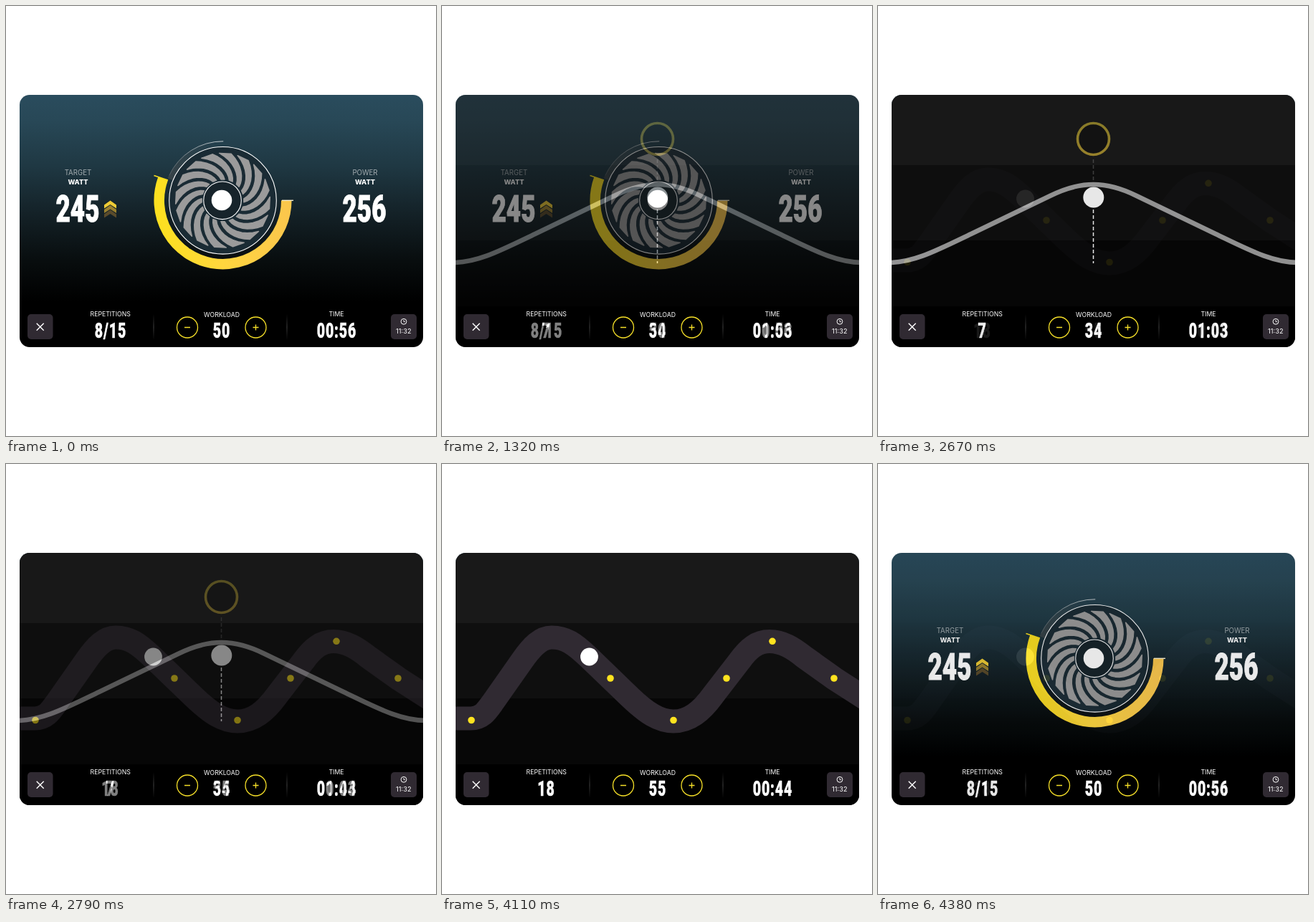
Animation of 600 by 600 pixels, one loop 4.41 s. Source, as an HTML page:

```html
<!DOCTYPE html>
<html lang="en">
<head>
<meta charset="utf-8">
<title>Workout display</title>
<style>
  html, body { margin: 0; width: 100%; height: 100%; overflow: hidden; background: #fff; }
  svg { display: block; width: 100vw; height: 100vh; }
  text { font-family: Inter, "Liberation Sans", sans-serif; fill: #fff; text-anchor: middle; }
  .num {
    font: 900 28.8px Roboto, "Liberation Sans", sans-serif; letter-spacing: 1.3px;
    stroke: #fff; stroke-width: .5px;
    transform: scaleX(.68); transform-box: fill-box; transform-origin: center;
  }
  .big { font-size: 51.5px; letter-spacing: 0; stroke-width: 1px; }
  .label { font-size: 8.7px; }
  .clock { font-size: 9.2px; }
  .soft { font-size: 9.7px; fill: #a3acb0; }
  .unit { font-size: 9.3px; font-weight: 800; }
  .line { fill: none; stroke: #fff; }
  .gold { fill: none; stroke: #f5df28; stroke-width: 1.3; }

  #wave { animation: wave 4410ms infinite; }
  #road { animation: road 4410ms infinite; }
  @keyframes wave {
    0% { opacity: 0; animation-timing-function: step-end; }
    26.53% { opacity: 0; animation-timing-function: steps(10, end); }
    33.33% { opacity: 1; animation-timing-function: step-end; }
    80%, 100% { opacity: 0; }
  }
  @keyframes road {
    0% { opacity: 0; animation-timing-function: step-end; }
    59.86% { opacity: 0; animation-timing-function: steps(10, end); }
    66.66% { opacity: 1; animation-timing-function: step-end; }
    93.19% { opacity: 1; animation-timing-function: steps(10, end); }
    100% { opacity: 0; }
  }
</style>
</head>
<body>
<svg viewBox="0 0 600 600">
  <defs>
    <clipPath id="card"><rect x="19" y="124" width="563" height="352" rx="14"/></clipPath>
    <linearGradient id="sky" x2="0" y2="1">
      <stop offset="0" stop-color="#2a4c5d"/>
      <stop offset=".1" stop-color="#284857"/>
      <stop offset=".28" stop-color="#1f3843"/>
      <stop offset=".5" stop-color="#121e23"/>
      <stop offset=".66" stop-color="#080d0e"/>
      <stop offset=".82" stop-color="#000"/>
    </linearGradient>
    <linearGradient id="sun">
      <stop offset="0" stop-color="#fce020"/>
      <stop offset=".5" stop-color="#ffd63e"/>
      <stop offset="1" stop-color="#fbc74c"/>
    </linearGradient>
    <linearGradient id="trail" gradientUnits="userSpaceOnUse" x1="222" y1="240" x2="303" y2="189">
      <stop offset="0" stop-color="#fff" stop-opacity=".1"/>
      <stop offset="1" stop-color="#fff" stop-opacity=".75"/>
    </linearGradient>
    <linearGradient id="wedge" gradientUnits="userSpaceOnUse" x1="222" y1="240" x2="290" y2="190">
      <stop offset="0" stop-color="#555" stop-opacity=".5"/>
      <stop offset="1" stop-color="#555" stop-opacity="0"/>
    </linearGradient>
    <linearGradient id="rule" x2="0" y2="1">
      <stop offset="0" stop-color="#444" stop-opacity="0"/>
      <stop offset=".5" stop-color="#444"/>
      <stop offset="1" stop-color="#444" stop-opacity="0"/>
    </linearGradient>
    <linearGradient id="ring" x2="0" y2="1">
      <stop offset="0" stop-color="#95862b"/>
      <stop offset="1" stop-color="#a68d2e"/>
    </linearGradient>
    <g id="night">
      <rect x="19" y="124" width="563" height="352"/>
      <rect x="19" y="124" width="563" height="98" fill="#191919"/>
      <rect x="19" y="222" width="563" height="105" fill="#0f0f0f"/>
      <rect x="19" y="327" width="563" height="92" fill="#070707"/>
    </g>
    <path id="chevron" d="M137 277.5l8.500-6 8.500 6v5l-8.500-5.500-8.500 5.500z"/>
  </defs>

  <g clip-path="url(#card)">
    <g id="fan">
      <rect x="19" y="124" width="563" height="352" fill="url(#sky)"/>
      <text class="soft" x="100.5" y="236">TARGET</text>
      <text class="unit" x="100.5" y="249">WATT</text>
      <text class="num big" x="100" y="301.200">245</text>
      <use href="#chevron" fill="#5a4b2b" y="13"/>
      <use href="#chevron" fill="#9b812e" y="6.500"/>
      <use href="#chevron" fill="#eecb35"/>
      <text class="soft" x="501" y="236">POWER</text>
      <text class="unit" x="501" y="249">WATT</text>
      <text class="num big" x="500" y="301.200">256</text>

      <path id="glow" fill="none" stroke="url(#wedge)" stroke-width="8"/>
      <path id="tail" fill="none" stroke="url(#trail)"/>
      <path id="gauge" fill="none" stroke="url(#sun)" stroke-width="14.500"/>
      <path d="M206.500 236.500L226 243" stroke="#fce11e" stroke-width="1.400"/>
      <path d="M385 271.300H401" stroke="#fff3cf" stroke-width="1.400"/>
      <circle cx="302.500" cy="271.300" r="74.800" fill="#1a2b34" stroke="#fff" stroke-width="1.100"/>
      <path id="blades" fill="#9b9b9b" stroke="#9b9b9b" stroke-width="1.500" stroke-linejoin="round"/>
      <circle cx="302" cy="271.300" r="26.300" fill="#17242b" stroke="#fff" stroke-width="1.100"/>
      <circle cx="301" cy="271" r="14.300" fill="#fff"/>

      <text class="num" x="146" y="463.500">8/15</text>
      <text class="num" x="301" y="463.500">50</text>
      <text class="num" x="461.500" y="463.500">00:56</text>
    </g>

    <g id="wave">
      <use href="#night"/>
      <path d="M300.500 214V248" class="line" stroke-width="1.500" stroke-dasharray="5 3" opacity=".22"/>
      <path d="M300.500 284V359" class="line" stroke-width="1.500" stroke-dasharray="5 3"/>
      <circle cx="300.500" cy="185.500" r="22" fill="#121212" stroke="url(#ring)" stroke-width="3.600"/>
      <path d="M15 358C50 358 82 341 130 318L240 265C264 253 284 249 300.500 249S337 253 361 265L471 318C519 341 551 358 586 358"
            fill="none" stroke="#a0a0a0" stroke-width="6.500"/>
      <circle cx="300.800" cy="267" r="14.500" fill="#fff"/>
      <text class="num" x="145.500" y="463.500">7</text>
      <text class="num" x="301" y="463.500">34</text>
      <text class="num" x="461.500" y="463.500">01:03</text>
    </g>

    <g id="road">
      <use href="#night"/>
      <path d="M10 355H40C56 355 62 345 72 331L112 274C126 254 138 242 153 242C172 242 184 250 205 270L262 325C285 347 303 359 323 359C345 359 362 345 378 323L415 275C428 257 440 247.500 457 247.500C475 247.500 490 257 505 269L547 299L595 330"
            fill="none" stroke="#302a32" stroke-width="33"/>
      <g id="dots" fill="#ffe31f"></g>
      <circle cx="205.500" cy="269" r="12.400" fill="#fff"/>
      <text class="num" x="145.500" y="463.500">18</text>
      <text class="num" x="301" y="463.500">55</text>
      <text class="num" x="461.500" y="463.500">00:44</text>
    </g>

    <g id="controls">
      <text class="label" x="145.700" y="433">REPETITIONS</text>
      <text class="label" x="301" y="434">WORKLOAD</text>
      <text class="label" x="461" y="433">TIME</text>
      <rect x="205.500" y="430" width="1" height="36" fill="url(#rule)"/>
      <rect x="391.500" y="430" width="1" height="36" fill="url(#rule)"/>
      <circle class="gold" cx="253" cy="448.500" r="14.500"/>
      <circle class="gold" cx="348.500" cy="448.500" r="14.500"/>
      <path class="gold" d="M249 448.500h8M344.500 448.500h8M348.500 444.500v8"/>
      <rect x="30" y="430" width="35.500" height="35" rx="5" fill="#302a32"/>
      <path class="line" stroke-width="1.400" d="M42.700 442.700l10 10m0-10l-10 10"/>
      <rect x="537" y="430" width="36" height="35" rx="5" fill="#302a32"/>
      <circle class="line" cx="555" cy="440.300" r="3.900"/>
      <path class="line" d="M555 438v2.600h2" stroke-width=".900"/>
      <text class="clock" x="554.800" y="457">11:32</text>
    </g>
  </g>
</svg>
<script>
  const $ = id => document.getElementById(id);
  const rad = deg => deg * Math.PI / 180;
  const polar = (r, deg) =>
    `${(302.5 + r * Math.cos(rad(deg))).toFixed(2)} ${(271.3 + r * Math.sin(rad(deg))).toFixed(2)}`;
  const arc = (r, from, to) =>
    `M${polar(r, from)}A${r} ${r} 0 ${to - from > 180 ? 1 : 0} 1 ${polar(r, to)}`;

  $('gauge').setAttribute('d', arc(88.8, 0, 200));
  $('glow').setAttribute('d', arc(79, 202, 262));
  $('tail').setAttribute('d', arc(82.5, 205, 270.5));

  // Each blade widens outward while it swings back against the clock.
  const count = 16, pitch = 360 / count, steps = 8;
  function blade(start) {
    const left = [], right = [];
    for (let i = 0; i <= steps; i++) {
      const u = i / steps, r = 29.5 + 36.5 * u;
      const mid = start - 42 * u ** 1.15;
      const half = pitch * (0.22 + 0.1 * u);
      left.push(polar(r, mid - half));
      right.unshift(polar(r, mid + half));
    }
    return `M${[...left, ...right].join('L')}Z`;
  }
  $('blades').setAttribute('d',
    Array.from({ length: count }, (_, i) => blade(i * pitch)).join(''));

  const stops = [[41, 357.5], [235, 299], [323, 357.5], [397, 299], [461, 247.3], [547, 299]];
  $('dots').innerHTML = stops.map(([x, y]) => `<circle cx="${x}" cy="${y}" r="4.8"/>`).join('');
</script>
</body>
</html>
```
